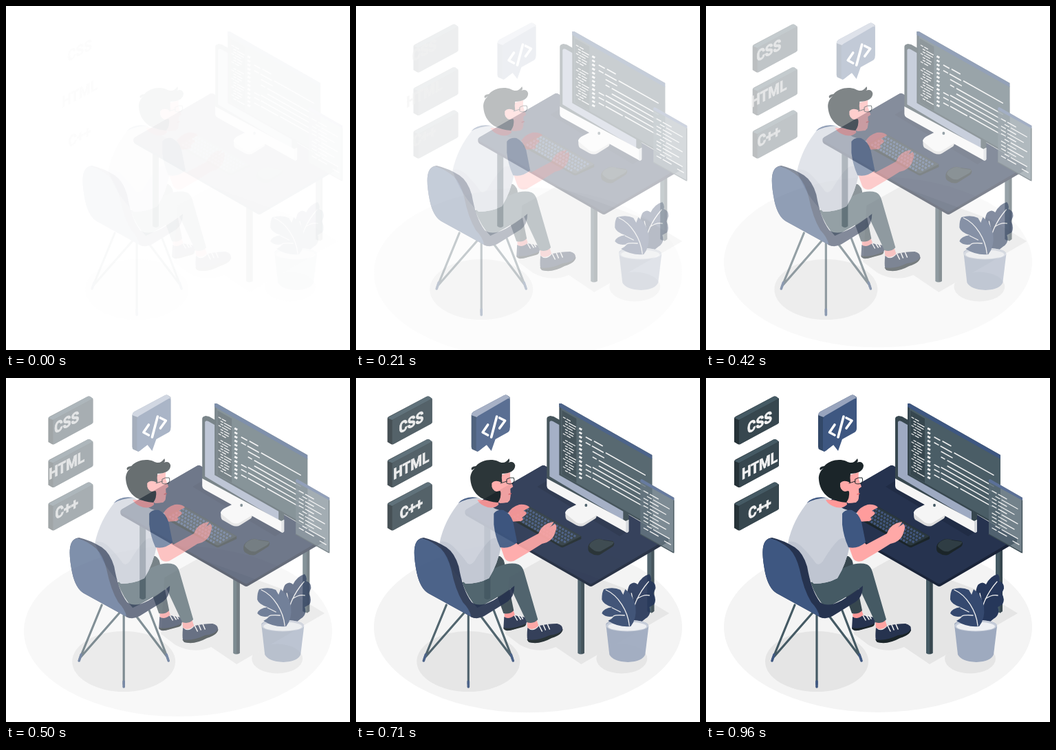
Animation of 500x500 px, one loop 1040 ms. Source, as an HTML page:

```html
<!DOCTYPE html>
<html lang="en">
<head>
<meta charset="utf-8">
<title>Programmer at a desk</title>
<style>
html, body { margin: 0; width: 100%; height: 100%; overflow: hidden; background: #fff; }
svg { display: block; width: 100vw; height: 100vh; }
text { font: 700 22px Roboto, Arial, sans-serif; fill: #f2f2f2; stroke: #f2f2f2; stroke-width: .9; text-anchor: middle; }
.line { fill: none; stroke-linecap: round; stroke-linejoin: round; }
</style>
</head>
<body>
<svg viewBox="0 0 500 500">
  <!-- data-x: how many slides a part is nested in; data-p: power of the fade -->
  <g data-x="0" data-y="1"><ellipse cx="250" cy="362" rx="224" ry="124" fill="#f4f4f4"/></g>

  <g data-x="1" fill="#e5e5e5">
    <ellipse cx="161" cy="412" rx="75" ry="44"/>
    <ellipse cx="384" cy="408" rx="37" ry="21.500"/>
    <path d="M215 372L236 388Q262 402 288 391L325 416L453 342L400 310L270 262L220 290Z"/>
  </g>

  <g data-x="1" id="workplace">
    <g id="desk">
      <path d="M184 205h9v115q-4 4-9 0z" fill="#37474f"/>
      <path d="M421 242h10v97q-5 4-10 0z" fill="#455a64"/>
      <path d="M427 242h4v97l-4 3z" fill="#37474f"/>
      <path d="M320 288h9.500v112q-5 3-9.500 0z" fill="#455a64"/>
      <path d="M325 288h4.500v112l-4.500 1z" fill="#37474f"/>
      <path d="M158 191L267 128Q270 126 273 128L452 233V238L342 302Q339 304 336 302L158 200Q154 196 158 191Z" fill="#1a2439"/>
      <path d="M158 191L267 128Q270 126 273 128L452 233L342 298Q339 300 336 298L158 196Q154 194 158 191Z" fill="#26334f"/>
      <path d="M261 158L276 149L394 222L381 230Z" fill="#202c45"/>
    </g>
    <g id="keyboard">
      <path d="M222 201L246 187Q248 186 250 187L325 230V234L299 246Q297 247 294 245L222 205Z" fill="#1b2529"/>
      <path d="M222 201L246 187Q248 186 250 187L325 230L299 243Q297 244 294 242Z" fill="#2b383f"/>
      <g id="keys" class="line" stroke="#42577e" stroke-width="3.200" stroke-dasharray="3.200 1.700" style="stroke-linecap:butt"></g>
      <path d="M335 248Q334 241 343 236Q350 232 356 235L371 237Q375 240 371 245L352 257Q345 259 338 254Q335 252 335 248Z" fill="#1b2529"/>
      <path d="M337 245Q336 240 344 236Q351 232 358 236L372 238Q373 240 369 243L353 252Q345 254 337 245Z" fill="#2f3d44"/>
    </g>
    <g id="monitor">
      <path d="M302 199Q301 193 310 189L318 185V176L340 188V194L346 197Q349 200 346 204L330 214Q325 217 318 214L304 206Q302 204 302 199Z" fill="#dcdcdc"/>
      <path d="M302 197Q301 192 310 188L318 184V176L340 188V193L346 196Q348 199 345 201L330 210Q325 213 318 210Z" fill="#f5f5f5"/>
      <path d="M275 59Q275 56 280 55L285 56L390 116Q394 119 394 124V212L275 148Z" fill="#37474f"/>
      <path d="M279 64Q280 61 284 63L386 121V207L279 143Z" fill="#9eaac2"/>
      <path d="M275 146L390 208L394 206V223Q392 226 388 223L278 162Q275 160 275 157Z" fill="#f5f5f5"/>
      <path d="M390 208L394 206V223Q392 226 390 224Z" fill="#d5d8dc"/>
      <ellipse cx="332" cy="185" rx="1.900" ry="2.300" fill="#455a64"/>
    </g>
    <g id="code">
      <path d="M293 37L296 37L428 112V215L425 216L293 141Z" fill="#37474f"/>
      <path d="M296 42L428 117V215L296 140Z" fill="#4a5d66"/>
      <path d="M297 47L318 59V152L297 140Z" fill="#37474f"/>
      <path d="M293 37L296 37L428 112V118L293 42Z" fill="#3e5781"/>
      <g id="rows" class="line" stroke="#f0f0f0" stroke-width="1.500"></g>
    </g>
    <g id="panel">
      <path d="M411 148L413 147L460 174V253L458 254L411 227Z" fill="#596b75" opacity=".84"/>
      <path d="M411 148L413 147L460 174V178L411 151Z" fill="#5b7097"/>
      <path class="line" d="M459.500 178V254L411 227" stroke="#37474f" stroke-width="1.200"/>
      <g id="notes" class="line" stroke="#f0f0f0" stroke-width="1.300"></g>
    </g>
  </g>

  <g data-x="1" id="plant">
    <path d="M393 358C389 334 391 304 396 300Q402 295 407 300Q413 288 424 285Q428 290 426 295Q434 298 433 306L430 313Q435 322 431 329L424 333Q428 344 418 350Q408 360 393 358Z" fill="#26375a"/>
    <path class="line" d="M397 357Q400 322 423 296M402 332L398 313M406 321Q416 314 424 316" stroke="#f0f0f0" stroke-width="1.300"/>
    <path d="M361 358Q361 352 392 352Q423 352 423 361L418 402Q414 412 393 413Q371 412 366 402Z" fill="#9eaabf"/>
    <ellipse cx="392" cy="360" rx="31" ry="8.500" fill="#c4cbd8"/>
    <ellipse cx="392" cy="361" rx="28" ry="6.500" fill="#eef0f4"/>
    <path d="M358 307Q372 303 382 308L386 315L389 307Q401 316 404 332Q406 350 397 361Q380 363 364 353Q370 350 373 346Q361 349 355 342Q357 335 370 333Q357 329 355 322Q355 311 358 307Z" fill="#35496f"/>
    <path class="line" d="M361 308C379 316 393 339 395 360M382 340L370 334M388 345Q376 344 372 346" stroke="#f0f0f0" stroke-width="1.300"/>
  </g>

  <g data-x="1" id="person">
    <path d="M213 343L226 337L230 348Q222 352 214 349Z" fill="#ff9898"/>
    <path d="M180 268Q192 256 207 259Q214 263 214 274L227 338Q221 344 212 342L197 300Z" fill="#37474f"/>
    <path d="M213 347Q219 352 228 345L244 348Q248 352 244 359L225 366Q214 369 212 364Z" fill="#26334f"/>
    <path d="M212 363Q225 366 245 357Q245 361 240 362L225 366Q214 369 212 363Z" fill="#1b2529"/>
    <path class="line" d="M228 345l4 7M233 345l4 6M237 345l3 5" stroke="#f5f5f5" stroke-width="1.500"/>
    <path d="M246 353L259 348L263 360Q255 368 247 363Z" fill="#ffa3a1"/>
    <path d="M152 297L205 274Q222 267 234 271Q240 274 242 282L262 351Q256 358 246 355L223 306Q196 324 174 334Q160 320 152 297Z" fill="#455a64"/>
    <path d="M247 363Q255 371 264 360Q278 357 290 357Q299 359 298 367Q294 375 281 377Q264 387 249 384Q245 382 247 363Z" fill="#26334f"/>
    <path d="M246 380Q260 383 279 374Q293 373 298 365Q298 373 282 378Q264 388 249 384Z" fill="#1b2529"/>
    <path class="line" d="M264 360l4 8M270 359l3 7M276 358l3 7" stroke="#f5f5f5" stroke-width="1.600"/>

    <path d="M218 197Q224 187 235 184Q245 183 250 188L241 193Q247 195 245 198L239 203Q243 206 237 208L222 209Z" fill="#ff9c9c"/>
    <path d="M176 174Q190 184 200 190L221 197Q210 210 208 245Q204 270 191 291Q176 299 157 299Q133 278 119 240Q126 206 150 178Q160 172 176 174Z" fill="#cbd0da"/>
    <path d="M120 238Q128 236 138 244Q150 256 158 267Q163 275 170 266Q183 244 193 235Q204 228 209 243Q204 270 191 291Q176 299 157 299Q133 278 120 238Z" fill="#bfc5d1"/>
    <path d="M146 182Q156 171 175 174Q158 175 146 182Z" fill="#3e5781"/>
    <path d="M207 243Q218 246 230 239L233 242L263 226Q266 216 277 211L285 209Q284 213 279 217L287 212Q291 215 287 225Q283 238 268 241Q248 254 227 266Q216 269 213 260Z" fill="#ffa8a7"/>
    <path d="M198 197Q202 191 212 192Q222 197 226 209L232 239Q220 249 207 246Q200 231 198 213Z" fill="#3e5781"/>

    <path d="M174 177L204 178L205 184Q197 192 184 186Q177 183 174 177Z" fill="#ff9898"/>
    <path d="M200 143L222 137Q221 145 223 150L226 158L222 161Q223 172 221 178Q215 183 205 181L196 172Z" fill="#ffa8a7"/>
    <path d="M164 148C163 140 167 134 171 131L166 134Q163 129 172 128C180 119 194 117 204 121C211 125 216 123 220 117Q222 121 219 123Q227 120 229 127C229 135 221 139 210 139Q209 144 210 151L208 165Q209 174 204 181Q190 180 179 174C169 167 165 158 164 148Z" fill="#1b2529"/>
    <path d="M209 152Q200 147 195 153Q194 163 202 165L207 164L211 170Q207 176 206 182L218 181Q222 178 222 170L218 154Z" fill="#ffa8a7"/>
    <path class="line" d="M208 153L217 150M217 147Q221 144 227 145Q229 149 226 153Q220 155 217 153Z" stroke="#1b2529" stroke-width="1"/>
    <path class="line" d="M220 169L223 168" stroke="#e56d70" stroke-width="1.400"/>
  </g>

  <g data-x="1" id="chair">
    <path class="line" d="M129 330L97 408M156 340L99 405M198 338L225 408M176 342L223 404M161 340V445" stroke="#455a64" stroke-width="3.200"/>
    <path class="line" d="M99 402L96 411M223 402L226 411M161 441V449" stroke="#3e5781" stroke-width="3.600"/>
    <path d="M158 319Q165 332 176 334Q196 326 223 306L228 302Q228 318 218 325L184 346Q174 352 164 347Z" fill="#26334f"/>
    <path d="M83 246Q85 233 96 232Q113 236 129 246Q141 254 147 274Q153 309 166 326Q177 334 196 324L176 348Q169 350 163 346L103 313Q91 306 86 283Q81 258 83 246Z" fill="#26334f"/>
    <path d="M83 246Q85 234 94 233Q110 238 121 248Q131 258 136 278Q142 308 153 326Q163 336 165 347L103 313Q91 306 86 283Q81 258 83 246Z" fill="#3e5781"/>
  </g>

  <g id="labels"></g>

  <g data-x="2" data-p="2" id="bubble">
    <path d="M163 54Q163 51 166 49L211 25Q213 24 215 25L219 28V72L172 107L165 104Q163 103 163 100Z" fill="#324868"/>
    <path d="M163 54Q163 51 166 49L211 25Q213 24 215 25L219 29L171 57Z" fill="#98a4bd"/>
    <path d="M170 60Q170 57 173 55L216 30Q219 29 219 32V73Q219 77 216 79L198 89L192 106L185 97L174 106Q170 108 170 104Z" fill="#3e5781"/>
    <path class="line" d="M187 68L179.500 79L187 83M200 56L192 86M204 58L212 62L204 73" stroke="#fff" stroke-width="3.600"/>
  </g>
</svg>
<script>
const $ = id => document.getElementById(id);
const SLOPE = 0.563;

// A stroke that runs along the screen's slanted axis.
const seg = (x, y, len) => `M${x} ${y}l${len} ${len * SLOPE}`;
const path = (d, extra = "") => `<path d="${d}" ${extra}/>`;

function drawKeys() {
  let d = "";
  for (let i = 0; i < 5; i++) d += `M${246 - i * 4.8} ${190 + i * 2.8}l${i === 4 ? 66 : 72} ${i === 4 ? 38 : 41}`;
  $("keys").innerHTML = path(d);
}

function drawCode() {
  let files = "", gutter = "", code = "";
  for (let i = 0; i < 20; i++) {
    if (i === 7) continue;
    const x = 299 + (i % 3 ? 3 : 0), y = 57 + i * 4 + (x - 299) * SLOPE;
    files += seg(x, y, 3) + seg(x + 5, y + 5 * SLOPE, 5 + (i * 5) % 6);
  }
  for (let i = 0; i < 13; i++) gutter += seg(322, 73 + i * 5.9, 4);
  const rows = [
    [332, 86, 8], [344, 92, 12], [332, 94, 6], [341, 99, 16],
    [342, 107, 11], [342, 115, 5], [351, 112, 7], [361, 109, 57],
    [332, 126, 7], [332, 133, 7], [332, 141, 7],
    [351, 120, 67], [351, 128, 72], [342, 130, 69], [342, 138, 74],
    [342, 146, 24], [370, 161, 46]
  ];
  rows.forEach(r => code += seg(...r));
  $("rows").innerHTML = path(files, 'stroke-width="1.200"') +
    path(gutter, 'stroke-width="2.800" stroke-linecap="butt"') + path(code);
}

function drawNotes() {
  let d = "";
  for (let i = 0; i < 11; i++) {
    const x = 416 + (i % 4 === 1 ? 5 : 0), y = 164 + i * 5.4 + (x - 416) * SLOPE;
    const len = 12 + (i * 11) % 22;
    d += seg(x, y, 6) + seg(x + 9, y + 9 * SLOPE, Math.min(len, 27));
  }
  $("notes").innerHTML = path(d + seg(446, 237, 9));
}

function drawLabels() {
  $("labels").innerHTML = ["CSS", "HTML", "C++"].map((word, i) => `
    <g transform="translate(0 ${i * 62.5})">
      <g data-x="2" data-p="2">
        <path d="M41 59Q41 57 43 56L98 27Q100 26 102 27L106 30V65L50 96Q48 97 46 96L41 93Z" fill="#263238"/>
        <path d="M41 58L98 27Q100 26 102 27L106 30L48 61Z" fill="#455a64"/>
        <path d="M48 63Q48 61 50 60L104 31Q106 30 106 32V64Q106 66 104 67L50 96Q48 97 48 95Z" fill="#37474f"/>
      </g>
      <g data-x="1" data-p=".5"><text transform="matrix(.866 -.45 0 1 78 72)">${word}</text></g>
    </g>`).join("");
}

drawKeys();
drawCode();
drawNotes();
drawLabels();

const parts = [...document.querySelectorAll("[data-x]")];
const LOOP = 1040, LAST = 23;

function progress(step) {
  if (step <= 17) return 0.03 + 0.0525 * step;
  return 1 - 0.0775 * ((LAST - step) / 6) ** 4;
}

function render(ms) {
  // 24 steps per second, the last one held
  const step = Math.min(LAST, Math.floor((ms + 4) * 0.024));
  const shown = progress(step), left = 1 - shown;
  for (const el of parts) {
    const { x, y = 0, p = 1 } = el.dataset;
    el.setAttribute("transform", `translate(${30 * x * left} ${52 * y * left * left})`);
    el.setAttribute("opacity", shown ** p);
  }
}

const start = performance.now();
function tick() {
  render((performance.now() - start) % LOOP);
  requestAnimationFrame(tick);
}
tick();
</script>
</body>
</html>
```
